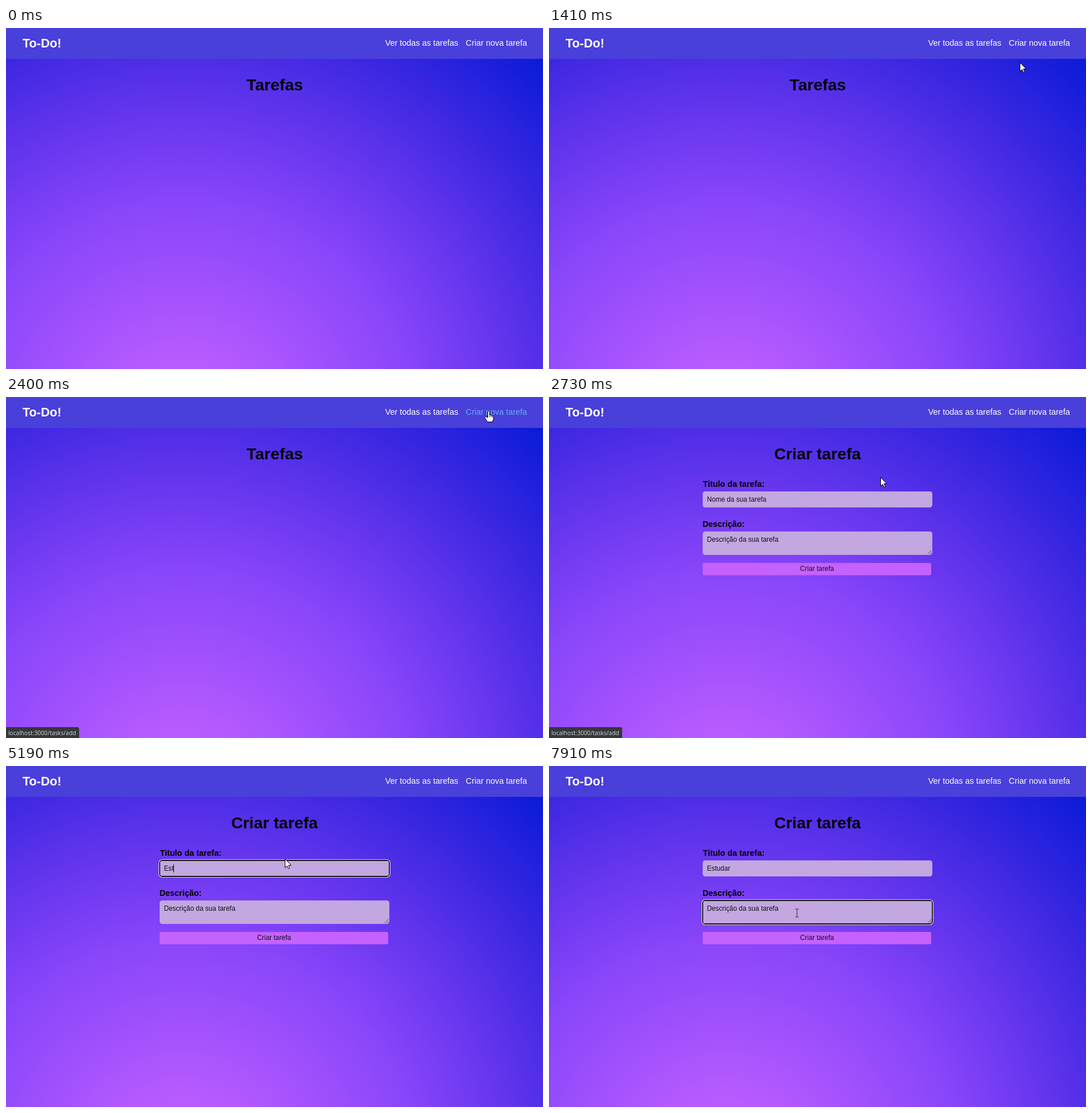
Animation, 940 px wide and 596 px high, one loop 8000 ms. Source, as an HTML page:

```html
<!DOCTYPE html>
<html lang="pt">
<head>
<meta charset="utf-8">
<title>To-Do!</title>
<style>
  html, body { margin: 0; width: 100%; height: 100%; overflow: hidden; }
  svg {
    display: block; width: 940px; height: 596px;
    font-family: "Liberation Sans", Arial, sans-serif;
    background: radial-gradient(circle at 310px 715px,
      #b95cff 120px, #8845fa 415px, #6636ee 565px, #3c27e1 730px, #0a1bd8 910px);
  }
  .nav { font-size: 14.4px; fill: #fff; }
  .nav.hover { fill: #66aef2; }
  .logo { font-size: 21.6px; font-weight: 700; fill: #fff; }
  .title { font-size: 28.4px; font-weight: 700; text-anchor: middle; }
  .label { font-size: 14.4px; font-weight: 700; }
  .small { font-size: 11.85px; fill: #140f1a; }
  .field { fill: #c2a7e0; }
  .ring { fill: none; stroke: #fff; stroke-width: 3.6; }
  .ring + .ring { stroke: #101010; stroke-width: 1.8; }
  .url { font: 10.2px "Open Sans", "Noto Sans", sans-serif; fill: #d3d6da; }
  .shape { fill: #fff; stroke: #000; stroke-linejoin: round; }
</style>
</head>
<body>
<svg viewBox="0 0 940 596">
  <rect width="940" height="54" fill="#493fdb"/>
  <text class="logo" x="29" y="34">To-Do!</text>
  <text class="nav" x="663.7" y="31">Ver todas as tarefas</text>
  <text class="nav" id="create" x="804.8" y="31">Criar nova tarefa</text>

  <text class="title" x="470.4" y="109" data-on="0-2500">Tarefas</text>

  <g data-on="2500-8000">
    <text class="title" x="470" y="109">Criar tarefa</text>

    <text class="label" x="269.5" y="157">Titulo da tarefa:</text>
    <rect class="field" x="269" y="165" width="402" height="28" rx="4.5"/>
    <g data-on="3120-7120">
      <rect class="ring" x="269" y="165" width="402" height="28" rx="4.5"/>
      <rect class="ring" x="269" y="165" width="402" height="28" rx="4.5"/>
      <rect class="field" x="270" y="166" width="400" height="26" rx="3.5"/>
    </g>
    <text class="small" x="276.4" y="183" data-on="0-4510">Nome da sua tarefa</text>
    <text class="small" id="typed" x="276.4" y="183"></text>
    <rect id="caret" y="172" width="1" height="14" data-on="3120-3990 4510-7120"/>

    <text class="label" x="268.7" y="227">Descrição:</text>
    <rect class="field" x="269" y="235" width="402" height="41" rx="4.5"/>
    <g data-on="7120-8000">
      <rect class="ring" x="269" y="235" width="402" height="41" rx="4.5"/>
      <rect class="ring" x="269" y="235" width="402" height="41" rx="4.5"/>
      <rect class="field" x="270" y="236" width="400" height="39" rx="3.5"/>
    </g>
    <path d="M663 274.5l6.5-6.5M667 274.5l2.5-2.5" stroke="#4c4356" fill="none"/>
    <text class="small" x="276.4" y="253">Descrição da sua tarefa</text>
    <rect x="276" y="242" width="1" height="13" data-on="7120-7910"/>

    <rect x="269" y="290" width="400" height="21.5" rx="2.7" fill="#c562ff"/>
    <text class="small" x="469.2" y="304" text-anchor="middle">Criar tarefa</text>
  </g>

  <g id="status">
    <path d="M0 577H125Q128 577 128 580V596H0Z" fill="#35373b"/>
    <text class="url" x="4" y="591">localhost:3000/tasks/add</text>
  </g>

  <g id="cursor">
    <path id="arrow" class="shape" d="M.5 .5v15.3l3.5-3.3 2.3 5 2.3-1-2.2-4.9h4.7z"/>
    <g id="hand">
      <path class="shape" d="M-1.6 12V1.8Q-1.4 .4 0 .4T1.6 1.8V7.2Q3.8 6.2 4.2 8Q6.2 7.2 6.6 9Q8.3 8.7 8.3 10.4V14.2L6.4 19.6H-2.2L-6.6 12.8Q-7.4 11.2-6 10.6T-3.4 11.2Z"/>
      <path d="M1.6 7v4M4.2 8v3.4M6.6 9v3" stroke="#000" stroke-width=".8"/>
    </g>
    <path id="beam" fill="none" stroke="#2c2533"
      d="M-3-7h2.2l.8.8.8-.8H3M0-6.4V6.4M-3 7h2.2l.8-.8.8.8H3"/>
  </g>
</svg>
<script>
  const LOOP = 8000;
  const $ = id => document.getElementById(id);
  const show = (el, on) => { el.style.display = on ? "" : "none"; };
  const ramp = (t, a, b) => Math.min(1, Math.max(0, (t - a) / (b - a)));
  const ease = k => k * k * (3 - 2 * k);

  // The pointer rests between eased moves
  const enter = { at: 290, x: 901, y: 588 };
  const moves = [
    { from: 290, to: 910, x: 824, y: 60 },
    { from: 1410, to: 2150, x: 844, y: 20 },
    { from: 2250, to: 2400, x: 845, y: 24 },
    { from: 2480, to: 2730, x: 580, y: 140 },
    { from: 2830, to: 2980, x: 490, y: 169 },
    { from: 3420, to: 3480, x: 488, y: 162 },
    { from: 6540, to: 6580, x: 502.5, y: 171 },
    { from: 6620, to: 6950, x: 434, y: 257 }
  ];
  const typing = { word: "Estudar", from: 4510, to: 6390 };

  const timed = [...document.querySelectorAll("[data-on]")].map(el => ({
    el, spans: el.dataset.on.split(" ").map(s => s.split("-").map(Number))
  }));

  function pointer(t) {
    let { x, y } = enter;
    for (const m of moves) {
      const k = ease(ramp(t, m.from, m.to));
      x += (m.x - x) * k;
      y += (m.y - y) * k;
    }
    return { x, y };
  }

  function drawPointer(t) {
    const { x, y } = pointer(t);
    const onLink = x > 804 && y < 36;
    const onField = x > 269 && x < 671 && (y > 165 && y < 193 || y > 235 && y < 276);
    $("cursor").setAttribute("transform", `translate(${x} ${y})`);
    show($("cursor"), t >= enter.at);
    show($("hand"), onLink);
    show($("beam"), onField);
    show($("arrow"), !onLink && !onField);
    $("create").classList.toggle("hover", onLink);
  }

  function drawTyping(t) {
    const { word, from, to } = typing;
    const step = (to - from) / (word.length - 1);
    const count = Math.max(0, Math.floor((t - from) / step) + 1);
    $("typed").textContent = word.slice(0, count);
    const end = count ? $("typed").getComputedTextLength() : 0;
    $("caret").setAttribute("x", Math.floor(276.4 + end));
  }

  function draw(t) {
    for (const { el, spans } of timed)
      show(el, spans.some(([a, b]) => t >= a && t < b));
    $("status").style.opacity = ramp(t, 1900, 2080) * (1 - ramp(t, 3120, 3270));
    drawTyping(t);
    drawPointer(t);
  }

  function tick() {
    draw(performance.now() % LOOP);
    requestAnimationFrame(tick);
  }
  tick();
</script>
</body>
</html>
```
